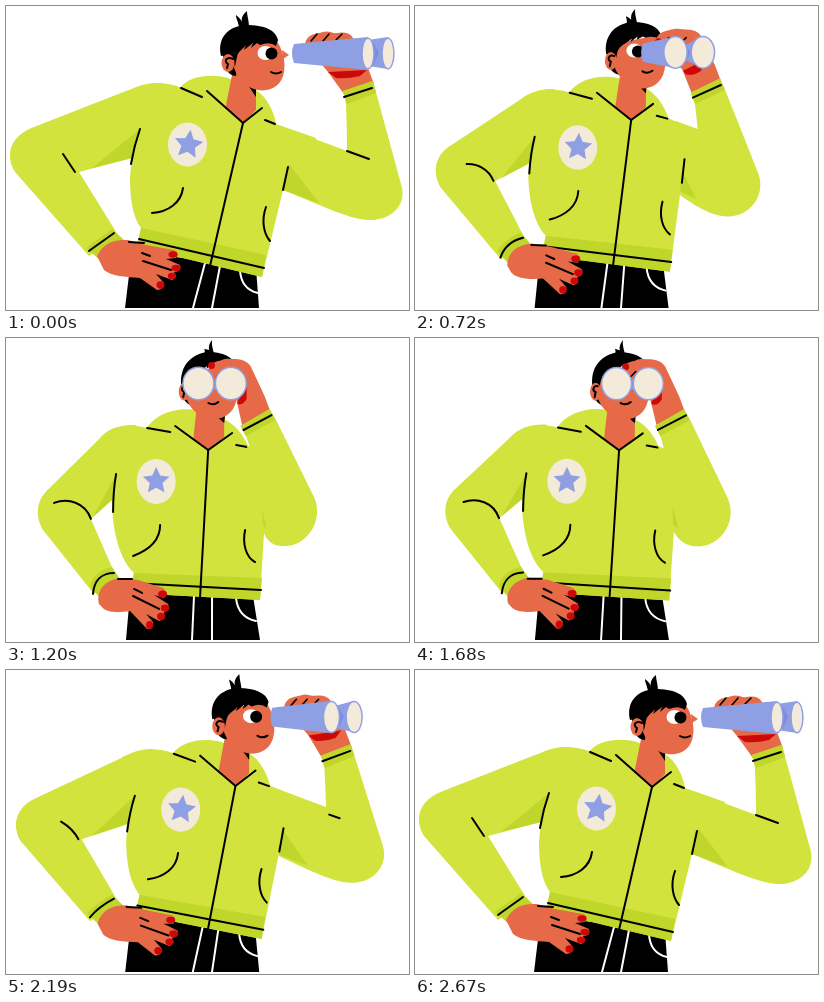
Recreate the animation shown at these times as an HTML page with a canvas. Size 403 by 304 pixels, loop 2700 ms.

```html
<!DOCTYPE html>
<html lang="en">
<head>
<meta charset="utf-8">
<title>Looking through binoculars</title>
<style>
html, body { margin: 0; width: 100%; height: 100%; overflow: hidden; background: #fff; }
canvas { display: block; }
</style>
</head>
<body>
<canvas id="stage" width="403" height="304"></canvas>
<script>
const LOOP = 2700;
const LIME = '#d1e33c', SHADE = '#c0d62b', SKIN = '#e66a48', RED = '#cc0808';
const BLUE = '#8f9fe3', CREAM = '#f4ead9', INK = '#000', WHITE = '#fff';
const ctx = document.getElementById('stage').getContext('2d');
const shapes = [];

// Every shape has a sideways pose and a front pose with matching commands.
function add(style, side, front) {
  const ends = front.match(/-?[\d.]+/g).map(Number);
  shapes.push({ ...style, side, ends });
}
const fill = (color, side, front) => add({ fill: color }, side, front);
const line = (side, front, color = INK, width = 2, until = 1) =>
  add({ stroke: color, width, until }, side, front);

const oval = (x, y, rx, ry) =>
  `M${x - rx} ${y} A${rx} ${ry} 0 1 1 ${x + rx} ${y} A${rx} ${ry} 0 1 1 ${x - rx} ${y}Z`;
const ovals = (color, side, front) => fill(color, oval(...side), oval(...front));

function star(x, y, r, turn) {
  const points = Array.from({ length: 10 }, (_, i) => {
    const a = turn + i * Math.PI / 5, d = i % 2 ? r * 0.48 : r;
    return (x + d * Math.sin(a)).toFixed(2) + ' ' + (y - d * Math.cos(a)).toFixed(2);
  });
  return 'M' + points.join('L') + 'Z';
}

// Trousers
fill(INK, 'M126 245L250 262L253 302L119 302Z', 'M125 245L247 258L254 302L120 302Z');
line('M199 257L187 302', 'M188 257L186 302', WHITE);
line('M214 260L206 302', 'M206 258L206 302', WHITE);
line('M234 264Q235 283 252 287', 'M230 260Q232 279 250 283', WHITE);

// Hood and neck
fill(LIME,
  'M174 82C182 70 205 67 222 72L250 84C260 90 268 105 270 118L237 130L200 100Z',
  'M139 92C150 74 172 69 190 72L217 81C227 85 236 94 242 108L202 120L165 100Z');
fill(SKIN, 'M227 64L219 104L237 118L250 104L250 80Z', 'M190 74L187 102L202 113L218 99L218 76Z');
fill(INK, 'M242 79L250 82L250 91Z', 'M210 78L219 77L218 85Z');

// Left arm
fill(LIME,
  'M152 77C140 76 128 82 120 85L28 121C3 130 -1 150 9 166L83 250L112 229L73 166L126 152L160 110Z',
  'M130 87C108 87 100 93 93 101L43 151C29 163 30 180 37 192L88 256L108 234L85 181L108 160L150 110Z');
fill(SHADE, 'M86 162L134 123L126 152Z', 'M87 179L110 136L108 160Z');

// Jacket
fill(LIME,
  'M150 77Q164 77 176 82L201 85L237 117L256 102L270 118L310 132L300 165L277 184L256 271L131 241L135 222C126 210 124 190 124 172Q125 150 135 123Z',
  'M118 88Q130 87 141 90L169 88L202 112L226 95L242 108L258 120L258 148L259 176L254 262L124 255L128 235C112 220 107 190 106 170Q107 150 110 136Z');
fill(SHADE, 'M135 222L260 249L256 271L131 241Z', 'M128 235L256 240L254 262L124 255Z');
line('M133 233L258 262', 'M125 245L255 252');
line('M201 85L237 117L256 102', 'M169 88L202 112L226 95');
line('M237 117L204 260', 'M202 112L194 259');
line('M175 82L196 91', 'M141 90L164 94');
line('M259 114L269 118', 'M230 107L241 109');
line('M146 207C162 206 175 197 177 182', 'M127 218C143 212 154 202 154 187');
line('M260 201C255 215 258 228 264 235', 'M239 192C236 206 240 219 249 224');
line('M134 123Q128 140 125 158', 'M110 136Q107 153 107 174');
line('M57 148C61 154 65 160 69 166', 'M48 165C62 160 79 164 85 181');
ovals(CREAM, [181.5, 138.5, 19.5, 22], [150, 143.5, 19.5, 22.5]);
fill(BLUE, star(182.5, 138.5, 15, 0.14), star(150, 143, 14, 0));

// Hand on the hip
fill(SHADE,
  'M80 242C88 236 98 229 106 223L118 234C108 238 100 246 94 254Z',
  'M84 248C86 238 95 231 106 229L114 241C104 245 98 252 97 264Z');
fill(SKIN,
  'M91 250C97 238 106 233 122 234L140 239L168 244Q174 247 170 252L160 253L174 259Q176 266 168 266Q172 272 166 274L150 268L158 277Q158 284 151 284L134 272C120 271 105 270 98 264Z',
  'M93 266C90 252 99 243 113 240L132 242L157 250Q163 255 158 260L148 257L162 266Q165 273 158 274Q160 281 153 283L140 276L147 284Q148 292 141 291L124 273C112 275 100 275 95 268Z');
line('M83 245C91 239 100 233 108 227', 'M87 256C88 242 96 235 108 235');
line('M123 236L138 237', 'M112 241L126 241');
line('M136 247L144 250', 'M128 251L136 255');
line('M137 255L165 264', 'M127 258L153 271');
ovals(RED, [167, 248.5, 4.5, 3.3], [156.5, 256, 4.5, 3.5]);
ovals(RED, [170, 262, 4.5, 3.3], [159, 270, 4.2, 3.5]);
ovals(RED, [166, 270, 4.2, 3.3], [155, 278.5, 4, 3.7]);
ovals(RED, [154.5, 279, 4, 3.7], [143.5, 287, 3.5, 4]);

// Head
fill(INK, 'M216 46L232 46L230 70Q223 70 220 62Z', 'M175 44L190 44L186 68Q180 66 177 60Z');
fill(SKIN,
  'M231 40L270 34C276 42 280 55 278 66C276 80 264 86 252 84C240 82 232 72 228 62Z',
  'M183 35L225 26C231 40 233 55 230 63C227 76 216 82 206 81C194 80 184 72 180 60Z');
fill(SKIN, 'M276 44L283 49L277 53Z', 'M222 44L225 49L222 53Z');
ovals(WHITE, [259.5, 47, 8, 7], [192, 43, 8, 7]);
ovals(INK, [265.5, 47.5, 6, 6], [194, 44, 6, 6]);
line('M265 66Q270 69 275 66', 'M202 65Q207 68 212 64');
fill(INK,
  'M215 50C211 32 222 20 240 19C258 19 270 24 272 34L270 40Q264 35 254 39L251 37L245 42L247 37L238 44L240 39C236 44 232 45 231 51L229 60L224 48Z',
  'M175 47C173 26 188 14 204 14C216 14 226 19 228 25L227 28Q220 25 215 27L212 26L206 28L206 26L200 31L201 28C195 33 186 35 183 42L181 52L178 47Z');
fill(INK,
  'M233 21C232 15 230 13 230 9C233 11 235 14 236 16C235 12 237 8 241 5C241 10 243 14 243 21Z',
  'M197 17C199 14 199 13 198 11C200 11 202 12 203 12C202 8 204 4 206 2C205 7 207 11 208 17Z');
ovals(SKIN, [222, 57, 6.5, 9], [178, 53.5, 5.5, 9]);
line('M227 53C221 50 217 55 222 58L221 62', 'M180 48C176 47 174 52 178 54L177 59');

// Right arm and raised hand
fill(SKIN,
  'M299 38C302 26 313 28 317 26C323 24 327 28 331 27Q343 25 347 32L362 62L368 78L338 88L322 66Z',
  'M202 30C205 23 211 24 215 22C219 20 225 21 230 21Q240 22 244 28L258 58L264 74L236 89L230 62Z');
fill(RED, 'M322 66L361 64L354 70Q342 73 330 72Z', 'M231 64L240 48L240 61Q236 68 231 66Z');
ovals(RED, [300, 48, 3.5, 3.5], [205, 27.5, 3.5, 3.5]);
line('M305 35L311 28', 'M210 39L215 34', INK, 1.6);
line('M317 35L323 28', 'M216 39L221 34', INK, 1.6);
line('M330 34L336 28', 'M222 39L227 34', INK, 1.6);
fill(LIME,
  'M290 126L341 145Q341 120 340 98L337 85L367 75L371 90L395 178C402 200 384 215 362 214C345 213 325 204 277 184L290 150Z',
  'M240 107L243 108Q241 102 239 97L234 88L263 71L270 83L308 160C318 185 298 209 278 208C268 208 261 205 257 193L256 150Z');
fill(SHADE, 'M283 158L277 184L313 197Z', 'M256 170L257 187L260 190Z');
fill(SHADE, 'M337 85L367 75L370 87L341 98Z', 'M234 88L263 71L269 82L239 98Z');
line('M282 161L277 184', 'M261 148L260 172', INK, 2, 0.85);
line('M338 91L366 82', 'M237 92L265 77');
line('M341 145L363 153', 'M258 143L226 131', INK, 2, 0.41);

// Binoculars
function lens(side, front) {
  const rim = values => values.map((v, i) => i > 1 ? v + 1.5 : v);
  ovals(BLUE, rim(side), rim(front));
  ovals(CREAM, side, front);
}
fill(BLUE, 'M362 34L382 31L382 63L362 60Z', 'M207 43L224 30L224 61L207 50Z');
fill('#7c8de0', 'M367 36L373 47L367 60Z', 'M207 44L209 46L207 50Z');
lens([382, 47.5, 5.2, 14.5], [224, 45.5, 14.8, 15.5]);
fill(BLUE, 'M288 38L362 31L362 64L288 57Q284 47 288 38Z', 'M187 37L191 30L191 61L187 55Q184 46 187 37Z');
lens([362, 47.5, 5.2, 14.5], [191.5, 45.5, 14.8, 15.5]);

const ease = t => t < 0.5 ? 4 * t ** 3 : 1 - 4 * (1 - t) ** 3;

function draw() {
  const phase = performance.now() % LOOP / LOOP;
  const turn = ease(1 - Math.abs(1 - 2 * phase));
  ctx.fillStyle = WHITE;
  ctx.fillRect(0, 0, 403, 304);
  ctx.lineCap = 'round';
  for (const s of shapes) {
    if (s.until < turn) continue;
    let i = 0;
    const path = new Path2D(s.side.replace(/-?[\d.]+/g, n => +n + (s.ends[i++] - n) * turn));
    if (s.fill) {
      ctx.fillStyle = s.fill;
      ctx.fill(path);
    } else {
      ctx.strokeStyle = s.stroke;
      ctx.lineWidth = s.width;
      ctx.stroke(path);
    }
  }
  requestAnimationFrame(draw);
}
draw();
</script>
</body>
</html>
```
